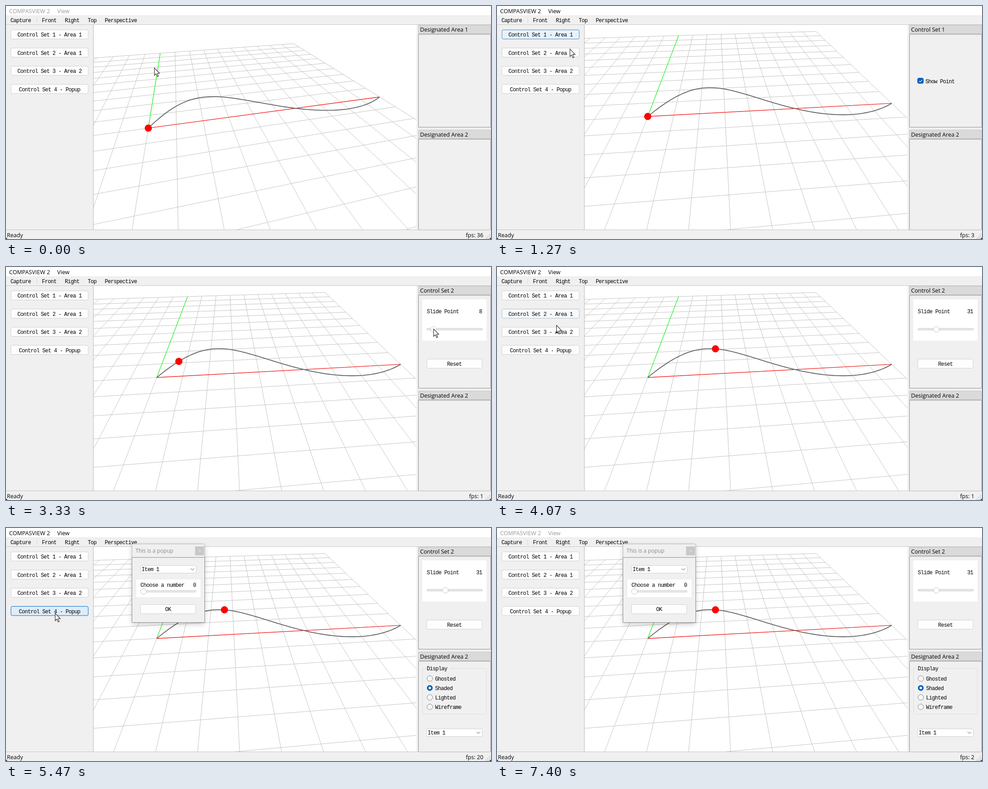
These frames come from a looping animation (1080 by 519 pixels, 7.47 s). An HTML page with a canvas:

```html
<!DOCTYPE html>
<html lang="en">
<head>
<meta charset="utf-8">
<title>Viewer controls</title>
<style>
  html, body { margin: 0; width: 100%; height: 100%; overflow: hidden; background: #fff; }
  canvas { display: block; }
</style>
</head>
<body>
<canvas id="stage" width="1080" height="519"></canvas>
<script>
const c = document.getElementById('stage').getContext('2d');
const LOOP = 7470, STEP = 200 / 3, FADE = 250;
const UI = '12.6px "Open Sans", "Noto Sans", sans-serif';
const MONO = '12px "Liberation Mono", monospace';

// Pointer waypoints: time, x, y
const route = [
  [0, 330, 138], [733, 322, 146], [1000, 150, 62], [1180, 155, 70],
  [1267, 162, 96], [2200, 164, 106], [2470, 150, 142], [2600, 1000, 170],
  [3267, 943, 138], [3533, 978, 138], [3667, 978, 138], [3930, 150, 106],
  [4067, 132, 130], [5270, 109, 190], [6067, 109, 190], [6933, 1090, 525]
];
const sets = ['1 - Area 1', '2 - Area 1', '3 - Area 2', '4 - Popup'];

const clamp = v => Math.max(0, Math.min(1, v));
const lerp = (a, b, f) => a + (b - a) * f;
const progress = (t, from, to) => clamp((t - from) / (to - from));
const mix = (a, b, f) => `rgb(${a.map((v, i) => Math.round(lerp(v, b[i], f)))})`;

function pointer(t) {
  const i = route.findIndex(k => k[0] > t);
  if (i < 1) return route.at(i ? -1 : 0).slice(1);
  const [t0, x0, y0] = route[i - 1], [t1, x1, y1] = route[i];
  const f = progress(t, t0, t1);
  return [lerp(x0, x1, f), lerp(y0, y1, f)];
}

function box(x, y, w, h, fill, line, r = 0) {
  c.beginPath();
  c.roundRect(x + .5, y + .5, w - 1, h - 1, r);
  if (fill) { c.fillStyle = fill; c.fill(); }
  if (line) { c.strokeStyle = line; c.lineWidth = 1; c.stroke(); }
}
function rect(x, y, w, h, color) {
  c.fillStyle = color;
  c.fillRect(x, y, w, h);
}
function path(points, color, width = 1) {
  c.beginPath();
  points.forEach(p => c.lineTo(...p));
  c.strokeStyle = color;
  c.lineWidth = width;
  c.stroke();
}
function disc(x, y, r, fill, line, width = 1) {
  c.beginPath();
  c.arc(x, y, r, 0, 7);
  c.fillStyle = fill;
  c.fill();
  if (line) { c.strokeStyle = line; c.lineWidth = width; c.stroke(); }
}
function label(text, x, y, font = MONO, color = '#000', align = 'left') {
  c.font = font;
  c.letterSpacing = font === MONO ? '-0.7px' : '0px';
  c.textAlign = align;
  c.fillStyle = color;
  c.fillText(text, x, y);
}
function button(text, x, y, w, hot = 0) {
  box(x, y, w, 21.4, mix([253, 253, 253], [222, 237, 249], hot),
    mix([208, 208, 208], [0, 103, 192], hot), 3);
  label(text, x + w / 2, y + 15.4, MONO, '#000', 'center');
}
function slider(x, y, value) {
  box(x, y - 3, 124, 5, '#e7e7e7', '#d2d2d2');
  disc(x + 6.5 + value * 1.125, y, 6.3, '#fff', '#c4c4c4');
}
function combo(x, y) {
  box(x, y, 125, 18, '#fff', '#d0d0d0', 2);
  label('Item 1', x + 3, y + 13);
  path([[x + 112, y + 7], [x + 116, y + 11], [x + 120, y + 7]], '#555');
}

// Orbit camera with a 45 degree lens, looking at a point of the ground plane
function camera(t) {
  const f = progress(t, 133, 733), rad = Math.PI / 180;
  const turn = lerp(-15.3, -5.5, f) * rad;
  const tilt = lerp(37.6, 32.8, (1 - f) ** 3) * rad;
  const cx = lerp(552.6, 555.2, f), cy = lerp(272.4, 269.6, f);
  const lens = 228 / Math.tan(22.5 * rad);
  const ahead = (x, y) => (y + 1.04) * Math.cos(turn) - (x - 3.76) * Math.sin(turn);
  const depth = (x, y) => 9.1 + ahead(x, y) * Math.cos(tilt);
  const project = (x, y) => {
    const side = (x - 3.76) * Math.cos(turn) + (y + 1.04) * Math.sin(turn);
    const k = lens / depth(x, y);
    return [cx + side * k, cy - ahead(x, y) * Math.sin(tilt) * k];
  };
  return { depth, project };
}

// Bezier through (0,0), (3,6), (5,-3), (10,0)
function curve(s) {
  const r = 1 - s;
  return [9 * s * r * r + 15 * s * s * r + 10 * s ** 3, 18 * s * r * r - 9 * s * s * r];
}

function scene(t, value) {
  const { depth, project } = camera(t);
  // Keep the part of a line that lies in front of the camera
  const gridLine = (x0, y0, x1, y1) => {
    const near = .2, d = depth(x0, y0);
    const f = d < near ? (near - d) / (depth(x1, y1) - d) : 0;
    path([project(lerp(x0, x1, f), lerp(y0, y1, f)), project(x1, y1)], '#c2c2c2');
  };
  c.save();
  c.beginPath();
  c.rect(195, 42, 719, 456);
  c.clip();
  rect(195, 42, 719, 456, '#fff');
  for (let i = -10; i <= 10; i++) {
    gridLine(i, -10, i, 10);
    gridLine(-10, i, 10, i);
  }
  path([project(0, 0), project(10, 0)], '#f00', 1.1);
  path([project(0, 0), project(0, 10)], '#0f0', 1.1);
  path(Array.from({ length: 101 }, (_, i) => project(...curve(i / 100))), '#606060', 1.8);
  disc(...project(...curve(value / 100)), 8, '#f00');
  c.restore();
}

function frame(t) {
  rect(0, 0, 1080, 519, '#f0f0f0');
  rect(0, 0, 1080, 21, '#fff');
  const color = t > 60 && t < 7395 ? '#000' : '#999';
  label('COMPASVIEW 2', 7, 15.5, UI, color);
  label('View', 114, 15.5, UI, color);
  rect(0, 21, 1080, 1, '#e8e8e8');
  rect(0, 41, 1080, 1, '#c8c8c8');
  [['Capture', 10], ['Front', 80], ['Right', 131], ['Top', 182], ['Perspective', 220]]
    .forEach(([s, x]) => label(s, x, 36));
  rect(68, 26, 1, 12, '#d4d4d4');
  rect(194, 42, 1, 456, '#b8b8b8');
}

// A button glows by the share of the last moments the pointer spent on it
function sidebar(t) {
  const trail = Array.from({ length: 26 }, (_, k) => pointer(t - k / 25 * FADE));
  sets.forEach((text, i) => {
    const top = 52.6 + i * 40.5;
    const inside = trail.filter(([x, y]) => x > 11 && x < 183 && y > top && y < top + 21);
    button('Control Set ' + text, 10.6, top, 173, inside.length / trail.length);
  });
}

function dock(title, y, h) {
  box(918, y, 162, 20, '#dadada', '#c2c2c2');
  label(title, 922, y + 14.8, UI);
  box(918, y + 20.5, 162, h, '#f0f0f0', '#828790');
}

function docks(t, value) {
  const shown = t < 1130 ? 0 : t < 1995 ? 1 : 2;
  dock(shown ? 'Control Set ' + shown : 'Designated Area 1', 42, 208);
  dock('Designated Area 2', 275.7, 203);

  if (shown === 1) {
    box(936, 160, 14, 13, '#005fb8', '#005fb8', 3);
    path([[940, 167], [942.3, 169.3], [947, 164.3]], '#fff', 1.2);
    label('Show Point', 954, 171.5);
  } else if (shown === 2) {
    rect(927, 72, 143, 92, '#fff');
    label('Slide Point', 937, 102.5);
    label(Math.round(value), 1060, 102.5, MONO, '#000', 'right');
    slider(937, 139, value);
    button('Reset', 936.6, 204.6, 124);
  }
  if (t >= 4530) {
    box(927, 312, 143, 103, null, '#dcdcdc', 2);
    rect(934, 308, 52, 9, '#f0f0f0');
    label('Display', 937, 317);
    ['Ghosted', 'Shaded', 'Lighted', 'Wireframe'].forEach((s, i) => {
      const y = 335.3 + i * 21;
      if (i === 1) disc(943.7, y, 4.6, '#fff', '#005fb8', 3.6);
      else disc(943.7, y, 6.2, '#f6f6f6', '#868686');
      label(s, 955.5, y + 5);
    });
    combo(936, 447);
  }
}

function statusBar(t) {
  rect(0, 498, 1080, 1, '#c4c4c4');
  label('Ready', 2, 514.5, UI);
  const rate = t < 130 ? 36 : t < 2130 ? 3 : t < 2930 ? 17 : t < 4530 ? 1 : t < 7395 ? 20 : 2;
  label('fps: ' + rate, 1063, 514.5, UI, '#000', 'right');
  for (let i = 0; i < 3; i++)
    for (let j = 0; j <= i; j++) rect(1076 - j * 4, 508 + i * 4, 2, 2, '#bdbdbd');
  c.fillStyle = '#000';
  for (const [x, s] of [[0, 1], [1080, -1]]) {
    c.beginPath();
    c.moveTo(x, 514);
    c.quadraticCurveTo(x, 519, x + 6 * s, 519);
    c.lineTo(x, 519);
    c.fill();
  }
}

function popup() {
  c.save();
  c.shadowColor = 'rgba(0,0,0,.2)';
  c.shadowBlur = 12;
  c.shadowOffsetY = 4;
  box(280, 35, 163, 176, '#f0f0f0', null, 3);
  c.restore();
  box(280, 35, 163, 176, '#f0f0f0', '#b4b4b4', 3);
  box(280, 65, 163, 146, '#f0f0f0', '#888');
  label('This is a popup', 288.5, 54.5, UI.replace('12.6', '12'), '#888');
  rect(421, 41, 20, 20, '#c8c8c8');
  path([[429, 48.5], [434, 53.5]], '#eee');
  path([[434, 48.5], [429, 53.5]], '#eee');
  combo(299, 83);
  rect(290, 115, 143, 39, '#fff');
  label('Choose a number', 299.5, 131);
  label('0', 423, 131, MONO, '#000', 'right');
  slider(299.5, 141.5, 0);
  button('OK', 299, 170, 124);
}

function cursor(t) {
  c.save();
  c.translate(...pointer(t));
  c.beginPath();
  if (t > 130 && t < 735) {
    const arm = [[-1.6, -6], [-4.5, -6], [0, -10.8], [4.5, -6], [1.6, -6], [1.6, -1.6]];
    for (let k = 0; k < 4; k++) {
      arm.forEach(p => c.lineTo(...p));
      c.rotate(Math.PI / 2);
    }
  } else {
    [[.5, 0], [.5, 16.5], [4.2, 13], [7, 19.3], [9.6, 18.2], [6.9, 12], [12, 12]]
      .forEach(p => c.lineTo(...p));
  }
  c.closePath();
  c.fillStyle = '#fff';
  c.fill();
  c.strokeStyle = '#222';
  c.lineWidth = 1.1;
  c.stroke();
  c.restore();
}

function draw(now) {
  const t = Math.floor((now % LOOP + 4) / STEP) * STEP;
  const value = 31 * progress(t, 3267, 3533);
  frame(t);
  scene(t, value);
  sidebar(t);
  docks(t, value);
  statusBar(t);
  if (t >= 5330) popup();
  cursor(t);
}
function tick() {
  draw(performance.now());
  requestAnimationFrame(tick);
}
tick();
</script>
</body>
</html>
```
